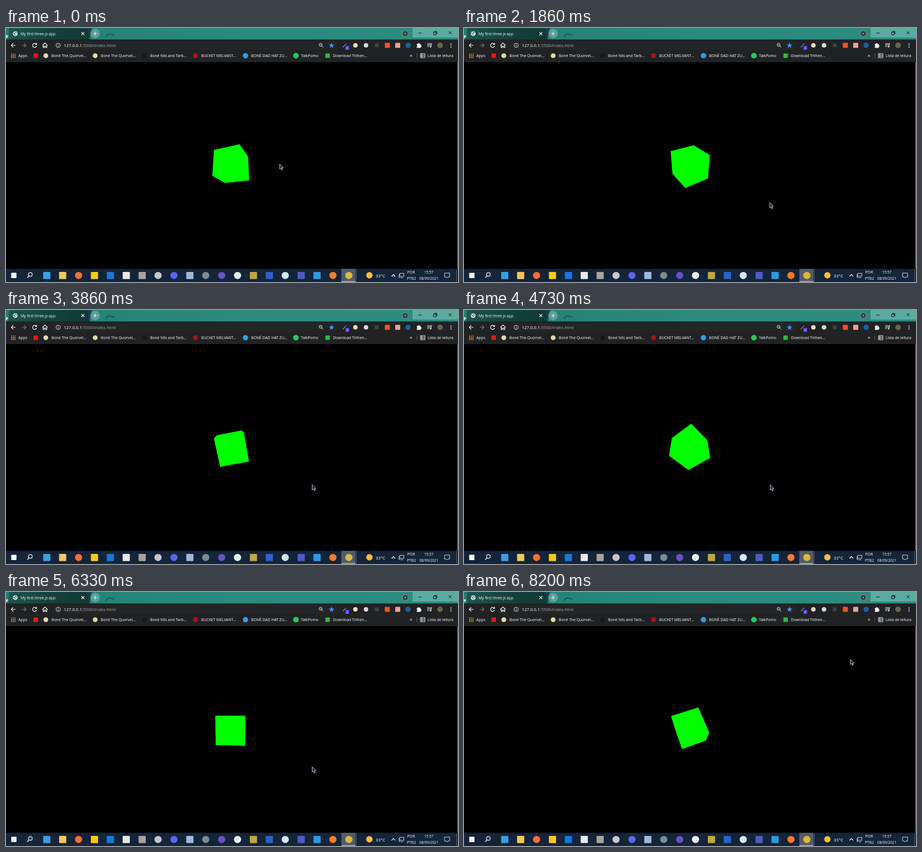
An HTML page for the animation above (8260 ms loop, 806 by 454 pixels).

```html
<!DOCTYPE html>
<html lang="pt">
<head>
<meta charset="utf-8">
<title>My first three.js app</title>
<style>
html, body { margin: 0; width: 100%; height: 100%; overflow: hidden; background: #000; }
svg { display: block; width: 806px; height: 454px; }
text { font: 6.8px "Open Sans", "Noto Sans", sans-serif; fill: #fff; }
.line { fill: none; stroke: #f1f2f3; stroke-width: 1.2; }
.thin { fill: none; stroke: #e4e6e8; stroke-width: .9; }
.dark { fill: none; stroke: #0c1615; stroke-width: 1; }
</style>
</head>
<body>
<svg viewBox="0 0 806 454">
  <defs>
    <linearGradient id="strip">
      <stop offset="0" stop-color="#237d72"/>
      <stop offset=".5" stop-color="#2a8a7e"/>
      <stop offset="1" stop-color="#2c8c80"/>
    </linearGradient>
    <linearGradient id="tab">
      <stop offset="0" stop-color="#1d5850"/>
      <stop offset=".5" stop-color="#14423c"/>
      <stop offset="1" stop-color="#113833"/>
    </linearGradient>
  </defs>

  <!-- tab strip -->
  <rect width="806" height="21" fill="url(#strip)"/>
  <path d="M0 13Q3 12 4 15L0 19Z" fill="#c9dbd8"/>
  <path d="M0 21Q5 20 5 14V4Q5 0 9 0H143Q147 0 147 4V14Q147 20 153 21Z" fill="url(#tab)"/>
  <path d="M146 0H153L149 19Q147 18 147 14Z" fill="#1c3c55"/>
  <path d="M178 16Q181 10 186 11T193 13" fill="none" stroke="#1d5c56" stroke-width="2"/>
  <circle cx="16.500" cy="10" r="4.300" fill="#eef1f1"/>
  <path d="M13 9l2.500 1 1 3M16 6.500l1 2 3 .5" fill="none" stroke="#28504c" stroke-width="1.200"/>
  <text x="26" y="12.500" style="font-size:6.700px">My first three.js app</text>
  <path class="line" d="M134.500 7.500l5 5m0-5l-5 5"/>
  <circle cx="159" cy="10" r="8.500" fill="#5c9f96"/>
  <path class="line" d="M155.500 10h7M159 6.500v7"/>
  <circle cx="712" cy="10" r="8" fill="#4f827c"/>
  <circle cx="712" cy="10" r="4.300" fill="#24443f"/>
  <path d="M710.300 9h3.400l-1.700 2.500z" fill="#9fc1bc"/>
  <rect x="725" width="81" height="17" fill="#5aaba0"/>
  <path class="dark" d="M735 9h6M762.500 7.500h4.500v4.500h-4.500zM764 7.500v-1.500h4.500v4.500H767M789.500 6l5 5m0-5l-5 5"/>

  <!-- toolbar and bookmarks -->
  <rect y="20.500" width="806" height="40.500" fill="#202224"/>
  <rect x="83" y="23" width="509" height="16" rx="8" fill="#232527"/>
  <path class="line" d="M17 31H9.500m3.500-3.700L9.300 31l3.700 3.700"/>
  <path class="line" d="M28 31h7.500m-3.500-3.700l3.700 3.700-3.700 3.700" style="stroke:#77797c"/>
  <path class="line" d="M54 29a3.600 3.600 0 1 0 .5 3M54.500 26.800v2.700h-2.700"/>
  <path class="line" d="M65 31l4.500-4.200L74 31M66.300 30.500v4.300h2v-2.500h2.400v2.500h2v-4.300"/>
  <circle class="thin" cx="93" cy="31" r="3.800"/>
  <path class="thin" d="M93 30.500v2.800M93 28.700v.9"/>
  <text x="103" y="34" style="font-size:7.670px">127.0.0.1<tspan fill="#a3a6a9">:5500/index.html</tspan></text>
  <circle class="thin" cx="561" cy="30" r="2.700"/>
  <path class="thin" d="M563 32l2.700 2.800M559.800 30h2.400"/>
  <path d="M580.500 26l1.400 3.400 3.600.3-2.800 2.300.9 3.600-3.100-2-3.100 2 .9-3.600-2.800-2.300 3.600-.3z" fill="#4b8cf5"/>
  <path class="thin" d="M600.500 34.500l6-6.500"/>
  <rect x="605" y="32" width="7" height="7" rx="1" fill="#5a3df0"/>
  <text x="607" y="37.800" style="font-size:5px">2</text>
  <path d="M732.500 28.500h2a1.500 1.500 0 0 1 3 0h2v2.300a1.500 1.500 0 0 1 0 3v1.700h-7v-2a1.400 1.400 0 0 0 0-2.700z" fill="#f0f1f2"/>
  <path class="line" d="M751 28h6M751 30.500h6M751 33h3.500M758 33.500v-5.500h2"/>
  <circle cx="757" cy="33.500" r="1.300" fill="#e4e6e8"/>
  <path d="M793.500 27.500v7.500" stroke="#e4e6e8" stroke-width="1.700" stroke-dasharray="1.700 1.200"/>
  <g stroke-width="1.900" stroke-dasharray="1.900 1.100">
    <path d="M9 46.500h8" stroke="#e0533f"/>
    <path d="M9 49.500h8" stroke="#d98f46"/>
    <path d="M9 52.500h8" stroke="#8fae4c"/>
  </g>
  <g id="marks"></g>
  <text x="720" y="52.300" style="font-size:9px">»</text>
  <path d="M732.500 45v9" stroke="#54575a"/>
  <path class="thin" d="M739 45.700h8v7.500h-8zM741.500 46v7M739 48.200h8M739 50.700h8"/>
  <text x="752" y="52" style="font-size:6.700px">Lista de leitura</text>

  <!-- page -->
  <rect y="61" width="806" height="370" fill="#000"/>
  <path d="M805.500 61v369.500" stroke="#85888a"/>
  <path id="cube" fill="#0f0"/>

  <!-- taskbar -->
  <rect y="430.500" width="806" height="23.500" fill="#142439"/>
  <rect x="598" y="430.500" width="25" height="23.500" fill="#515d69"/>
  <rect x="598" y="452.500" width="25" height="1.500" fill="#8ab8de"/>
  <path d="M624.500 431v23M803.500 431v23" stroke="#59636e"/>
  <circle class="line" cx="43.500" cy="440.500" r="3.300"/>
  <path class="line" d="M41 443l-3 3.500"/>
  <text x="659" y="445.500" style="font-size:7.900px">33°C</text>
  <path class="line" d="M687.500 444l3.300-3.300 3.300 3.300"/>
  <path class="thin" d="M702 438.500h7.500v5.500H702zM704 446.500h4M701 440v6h2"/>
  <text x="715.500" y="439.300">POR</text>
  <text x="715" y="449.800">PTB2</text>
  <text x="746" y="439.300" style="font-size:6.300px">15:57</text>
  <text x="737" y="449.800" style="font-size:6.400px">08/09/2021</text>
  <path class="thin" d="M782 438h9v7h-3l-1.500 2-1.500-2h-3z"/>

  <g id="icons"></g>
  <path id="pointer" d="M0 0V9.200L2.200 7.300 3.700 10.700 5.200 10 3.800 6.700H6.500Z" fill="#141a38" stroke="#d5daea" stroke-width=".9"/>
</svg>
<script>
const LOOP = 8260;
const $ = id => document.getElementById(id);

function add(parent, tag, attrs, label = '') {
  const node = document.createElementNS('http://www.w3.org/2000/svg', tag);
  for (const key in attrs) node.setAttribute(key, attrs[key]);
  node.textContent = label;
  parent.append(node);
}

function dot(x, y, r, fill) {
  add($('icons'), 'circle', { cx: x, cy: y, r, fill });
}

function square(x, y, r, fill) {
  add($('icons'), 'rect', { x: x - r, y: y - r, width: 2 * r, height: 2 * r, rx: 1, fill });
}

const bookmarks = [
  [22, 'Apps'], [81, 'Boné The Quorvel...'], [169, 'Boné The Quorvel...'],
  [257, 'Boné Nils and Tarb...'], [348, 'BUCKET MELVANT...'],
  [437, 'BONÉ DAD HAT ZU...'], [526, 'TalkPomo'], [583, 'Download Trilhen...']
];
for (const [x, label] of bookmarks) add($('marks'), 'text', { x, y: 52 }, label);

// bookmark icons
square(53, 49.5, 4, '#f01414');
dot(71, 49.5, 4.3, '#e6d8a4');
dot(159, 49.5, 4.3, '#e6d8a4');
square(247, 49.5, 4, '#17181a');
dot(338, 49.5, 4.5, '#a8121f');
dot(427, 49.5, 4.8, '#2d9fe0');
dot(517, 49.5, 5, '#29c75f');
square(573.5, 49.5, 4, '#35b548');

// extensions
dot(623, 31, 4, '#efd9c2');
dot(642, 31, 4, '#d4d8da');
square(661, 31, 3.5, '#3d4144');
square(680, 31, 4.5, '#ff4f24');
square(698.5, 31, 4.5, '#e9a197');
dot(717, 31, 4.8, '#1c5f9e');
dot(774, 31, 5, '#6b6350');

// taskbar apps, evenly spaced
const apps = [
  's#3b9fe0', 's#f3c859', 'o#ff6c37', 's#f8cc12', 's#1678dc', 's#e9e9e9', 's#a9a49b',
  'o#c9c6cf', 'o#5865f2', 's#9eb9d8', 'o#7f8a90', 'o#6652c7', 'o#eef3f8', 's#c5a53c',
  's#2a62c8', 'o#d5e8f7', 's#5159c4', 's#279be6', 'o#ff7a26', 'o#dfb83a'
];
square(14, 442.3, 4.7, '#f4f6f8');
apps.forEach((app, i) => {
  const x = 72.7 + i * 28.35;
  const shape = app[0] === 's' ? square : dot;
  shape(x, 442.3, 6.4, app.slice(1));
});
dot(648, 442, 5.7, '#fbbd3c');

// unit cube seen from distance 5 with a 75 degree field of view
const CENTER = [402.5, 245.3];
const FOCAL = 184.5 / Math.tan(37.5 * Math.PI / 180);
const QUAD = [[-1, -1], [1, -1], [1, 1], [-1, 1]];

function project([x, y, z], a) {
  const c = Math.cos(a), s = Math.sin(a);
  const px = c * x + s * z;
  const turned = c * z - s * x;
  const py = c * y - s * turned;
  const k = FOCAL / (5 - (s * y + c * turned) / 2) / 2;
  return [CENTER[0] + px * k, CENTER[1] - py * k];
}

// outlines of the faces that point at the viewer
function cubePath(a) {
  let d = '';
  for (let axis = 0; axis < 3; axis++) {
    for (const side of [-1, 1]) {
      const pts = QUAD.map(([u, v]) => {
        const p = [];
        p[axis] = side;
        p[(axis + 1) % 3] = u * side;
        p[(axis + 2) % 3] = v;
        return project(p, a);
      });
      const [p, q, r] = pts;
      const turn = (q[0] - p[0]) * (r[1] - q[1]) - (q[1] - p[1]) * (r[0] - q[0]);
      if (turn < 0) d += 'M' + pts.map(n => n.map(v => v.toFixed(2))).join('L') + 'Z';
    }
  }
  return d;
}

// the spin starts a little slower, then holds 0.6 rad/s
const angle = t => t < 1.86 ? -0.4 + 0.516 * t : 1.28 + 0.6 * (t - 3.06);

function ease(t, from, to) {
  const p = Math.min(1, Math.max(0, (t - from) / (to - from)));
  return p * p * (3 - 2 * p);
}

function pointerAt(t) {
  const first = ease(t, 0.1, 1.3), nudge = ease(t, 1.8, 2), last = ease(t, 7.45, 8.2);
  return [488 + 57 * first + nudge + 143 * last, 243 + 69 * first + nudge / 2 - 192 * last];
}

function draw(now) {
  // fifteen steps a second, on a 10 ms grid
  const tick = Math.floor(now % LOOP / 10);
  const step = Math.ceil(3 * (tick + 1) / 20) - 1;
  const t = step / 15;
  $('cube').setAttribute('d', cubePath(angle(t)));
  $('pointer').setAttribute('transform', `translate(${pointerAt(t)})`);
}

const start = performance.now();
function loop() {
  draw(performance.now() - start);
  requestAnimationFrame(loop);
}
loop();
</script>
</body>
</html>
```
